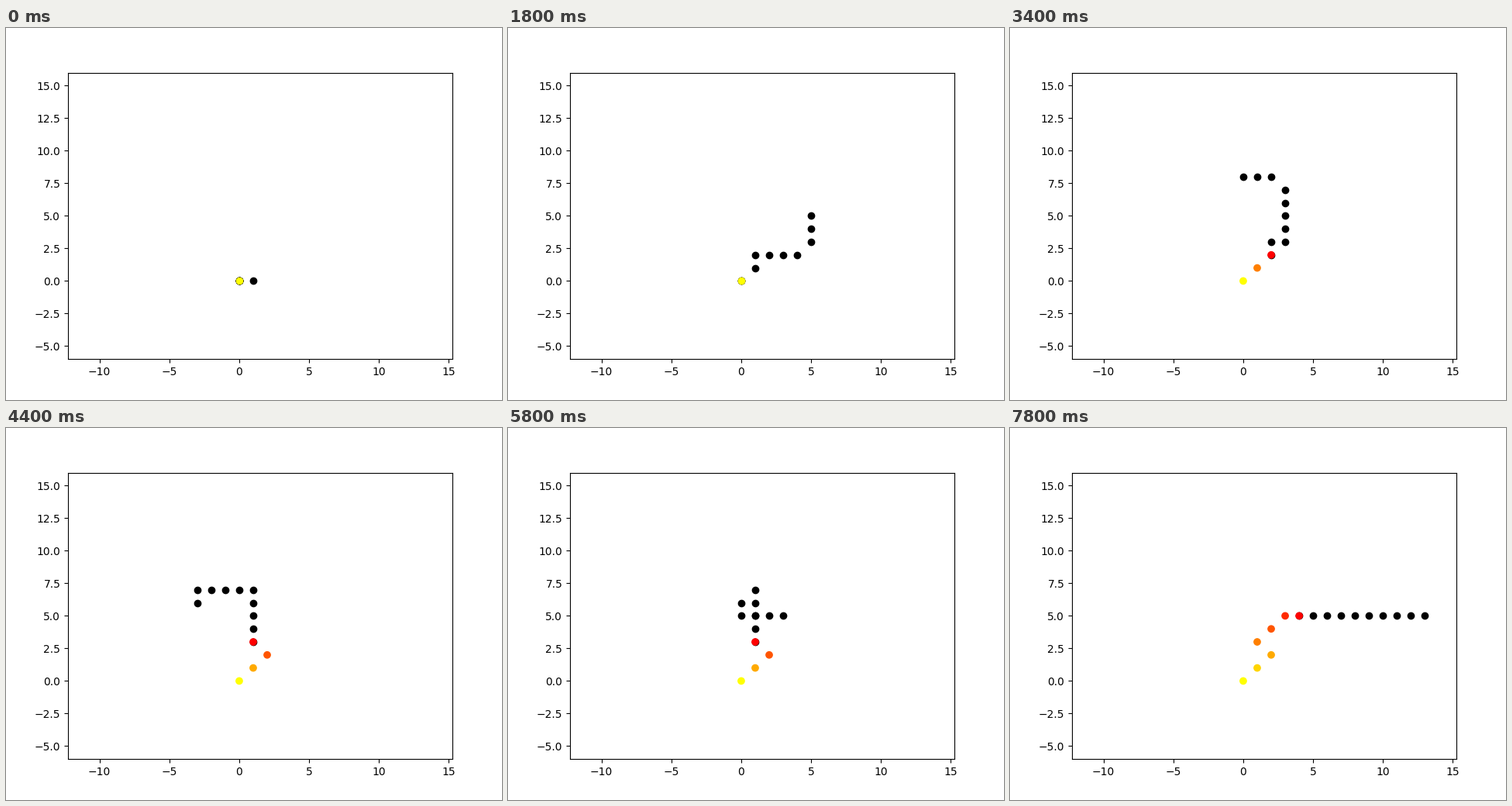
Write a matplotlib script that moves like this. It is 640 px wide and 480 px high and loops after 8000 ms.

```python
import numpy as np
import matplotlib.pyplot as plt
from matplotlib.animation import FuncAnimation

KNOTS = 10
FRAMES = 40
MOVES = [("R", 5), ("U", 8), ("L", 8), ("D", 3), ("R", 16)]
STEP = {"R": (1, 0), "L": (-1, 0), "U": (0, 1), "D": (0, -1)}


def follow(knot, lead):
    """Pull a knot next to its leader, horizontal gaps first."""
    (x, y), (lx, ly) = knot, lead
    if abs(lx - x) > 1:
        return x + (1 if lx > x else -1), ly
    if abs(ly - y) > 1:
        return lx, y + (1 if ly > y else -1)
    return knot


def simulate():
    """Return the rope and the cells visited by its tail after each step."""
    rope = [(0, 0)] * KNOTS
    trail = [(0, 0)]
    states = []
    for way, count in MOVES:
        dx, dy = STEP[way]
        for _ in range(count):
            rope[0] = rope[0][0] + dx, rope[0][1] + dy
            for i in range(1, KNOTS):
                rope[i] = follow(rope[i], rope[i - 1])
            if rope[-1] not in trail:
                trail.append(rope[-1])
            states.append((rope[:], trail[:]))
    return states


states = simulate()

fig, ax = plt.subplots(figsize=(6.4, 4.8), dpi=100)
ax.set_xlim(-12.25, 15.25)
ax.set_ylim(-6, 16)
rope_dots = ax.scatter([0], [0], color="black")
trail_dots = ax.scatter([0], [0], c=[0], cmap="autumn_r")


def draw(frame):
    rope, trail = states[frame]
    rope_dots.set_offsets(rope)
    trail_dots.set_offsets(trail)
    trail_dots.set_array(np.arange(len(trail)))
    trail_dots.set_clim(0, max(len(trail) - 1, 1))
    return rope_dots, trail_dots


anim = FuncAnimation(fig, draw, frames=FRAMES, interval=200,
                     repeat=True, repeat_delay=0)
plt.show()
```
